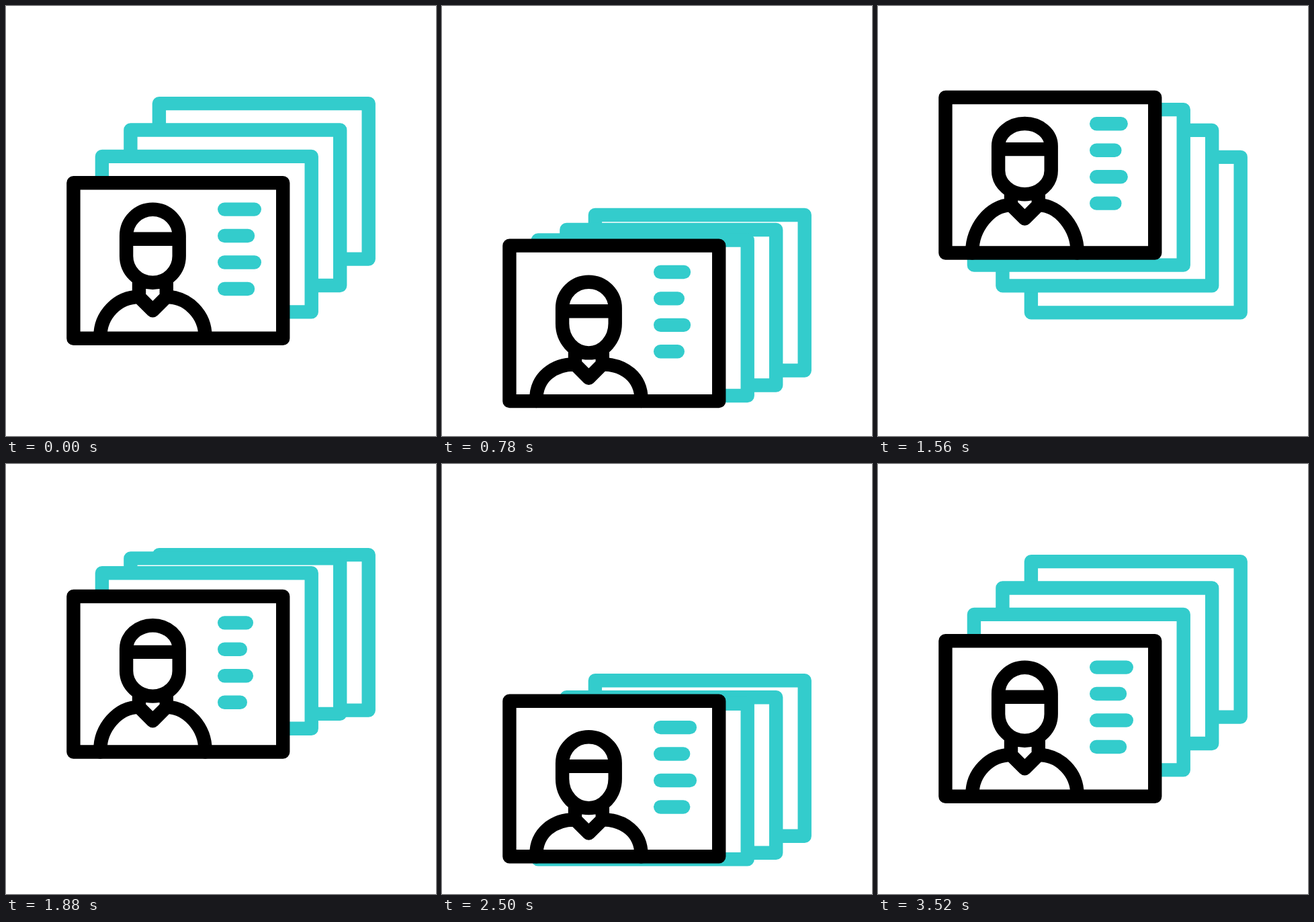
An HTML page that plays this animation: 640x640 px, repeating every 3600 ms.

```html
<!DOCTYPE html>
<html lang="en">
<head>
<meta charset="utf-8">
<title>Profile cards</title>
<style>
  html, body { margin: 0; width: 100%; height: 100%; overflow: hidden; background: #fff; }
  svg { display: block; width: 100vw; height: 100vh; }
</style>
</head>
<body>
<svg id="stage" viewBox="0 0 640 640" fill="none" stroke-width="20.4" stroke-linecap="round" stroke-linejoin="round"></svg>
<script>
const LOOP = 3600, REST_AT = 3520, STEP = 20;
const TEAL = '#33cccc', BLACK = '#000';
const FRONT_Y = 263.3, GAP_X = 42.5, GAP_Y = 39.4;

// Turning points of each card, front to back: rest, low, high, low, rest
const TIMES = [
  [0, 800, 1600, 2400, 3200],
  [0, 920, 1704, 2500, 3278],
  [0, 1018, 1802, 2600, 3360],
  [0, 1115, 1906, 2697, 3436]
];

const stage = document.getElementById('stage');

function add(parent, tag, attrs) {
  const el = document.createElementNS('http://www.w3.org/2000/svg', tag);
  for (const name in attrs) el.setAttribute(name, attrs[name]);
  parent.appendChild(el);
  return el;
}

const ease = x => x * x * (3 - 2 * x);
const mix = (a, b, x) => a + (b - a) * x;

// Blends the rest, low and high values along the given turning points
function swing(t, times, low, high) {
  const values = [0, low, high, low, 0];
  for (let i = 0; i < 4; i++) {
    if (t < times[i + 1]) {
      const x = (t - times[i]) / (times[i + 1] - times[i]);
      return mix(values[i], values[i + 1], ease(x));
    }
  }
  return 0;
}

const cards = [];
for (let k = 3; k >= 0; k--) {
  cards[k] = add(stage, 'g', {});
  add(cards[k], 'rect', {
    x: 100.4 + GAP_X * k, y: FRONT_Y - GAP_Y * k, width: 311.8, height: 231.5,
    fill: '#fff', stroke: k ? TEAL : BLACK
  });
}

const person = add(cards[0], 'path', { stroke: BLACK });
const lines = [0, 1, 2, 3].map(() => add(cards[0], 'path', { stroke: TEAL }));

function personPath(t) {
  const at = (y, low, high) => y + swing(t, TIMES[0], low, high);
  const top = at(302.8, 14.6, -0.6);
  const brow = at(342, 14.3, -6.4);
  const band = at(346.7, 14.3, -6.4);
  const jaw = at(372.3, 7, 0);
  const chin = at(411.7, 11.4, -4.3);
  const base = at(433, 7, -9.6);
  const left = 179.1, right = 257.7, mid = 218.4;
  const ry = brow - top, cy = chin - jaw;
  return `M${left} ${brow}A39.3 ${ry} 0 0 1 ${right} ${brow}V${jaw}` +
    `A39.3 ${cy} 0 0 1 ${left} ${jaw}ZM${left} ${band}H${right}` +
    `M198 ${chin}V${base}L${mid} ${base + 20.4}L238.8 ${base}V${chin}` +
    `M140.3 494.8V492C140.3 459.4 166 ${base} 198 ${base}` +
    `M296.5 494.8V492C296.5 459.4 270.8 ${base} 238.8 ${base}`;
}

function draw(time) {
  let t = Math.floor((time % LOOP) / STEP) * STEP;
  if (t >= REST_AT) t = 0;

  cards.forEach((card, k) => {
    const low = 93.5 + GAP_Y * k, high = -128.9 + GAP_Y * k;
    card.setAttribute('transform', `translate(0 ${swing(t, TIMES[k], low, high)})`);
  });

  person.setAttribute('d', personPath(t));

  const phase = (t % 1200) / 600;
  const shrink = ease(phase < 1 ? phase : 2 - phase);
  lines.forEach((line, i) => {
    const end = i % 2 ? 360 - 11.8 * shrink : 369.8 - 12.6 * shrink;
    line.setAttribute('d', `M325.2 ${302.6 + 39.45 * i}H${end}`);
  });
}

const start = performance.now();
function tick() {
  draw(performance.now() - start);
  requestAnimationFrame(tick);
}
draw(0);
requestAnimationFrame(tick);
</script>
</body>
</html>
```
